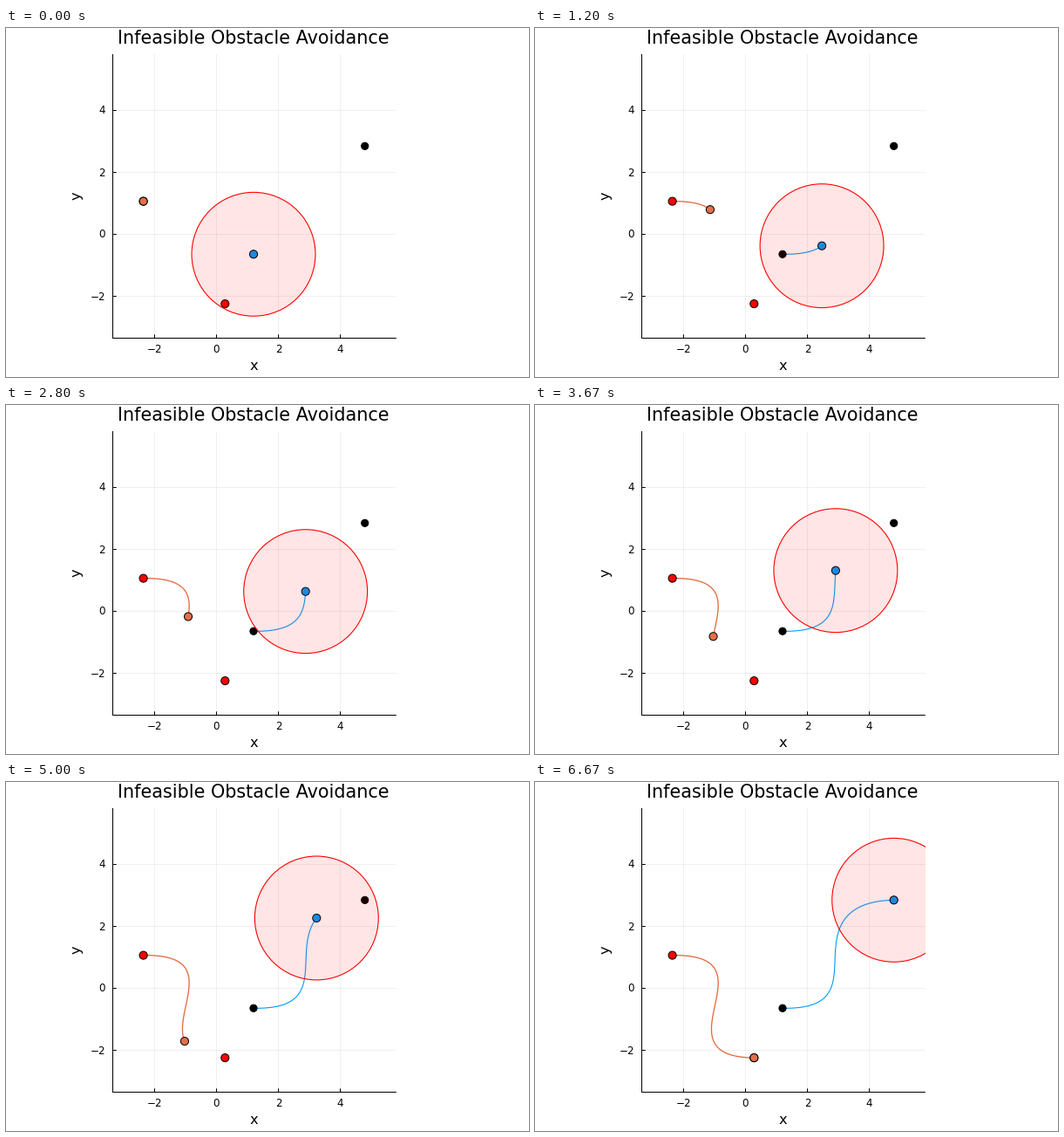
These frames come from a looping animation (600 by 400 pixels, 6740 ms). A matplotlib script:

```python
import numpy as np
import matplotlib.pyplot as plt
from matplotlib.animation import FuncAnimation
from matplotlib.patches import Circle, Rectangle

W, H, DPI = 600, 400, 100
LOOP, TICK = 6740, 20            # ms
STEPS, RATE = 100, 15            # simulation steps, steps per second
LEFT, RIGHT, TOP, BOTTOM = 122.5, 447.3, 30.5, 355.5
UNIT, X0, Y0 = 35.47, 241.6, 236.4
BLUE, ORANGE = "#009afa", "#e36f47"

plt.rcParams["font.family"] = "DejaVu Sans"


def pt(px):
    return px * 72 / DPI


def ease(s):
    return s * s * (3 - 2 * s)


def paths(blue_a, blue_b, orange_a, orange_b):
    """S-shaped paths: a shared sideways sweep that brakes midway, plus a late spread."""
    s = np.arange(STEPS + 1) / STEPS
    v = 2 * s - 1
    q = 1 - v * v
    sweep = (1 + v**3 - (0.13 - 0.07 * v) * v * q - 0.015 * q * q) / 2
    spread = ease(s) - 3.6 * s**2.5 * (1 - s)**2
    dx_blue, dx_orange = blue_b[0] - blue_a[0], orange_b[0] - orange_a[0]
    mean, half = (dx_blue + dx_orange) / 2, (dx_blue - dx_orange) / 2

    def path(a, b, side, lag):
        x = a[0] + mean * sweep + side * half * spread
        y = a[1] + (b[1] - a[1]) * ease(s - lag)
        return x, y

    return path(blue_a, blue_b, 1, 0.009), path(orange_a, orange_b, -1, 0.005)


blue, orange = paths((284, 259.3), (411.7, 135.3), (157.6, 198.6), (251.3, 316.1))

fig = plt.figure(figsize=(W / DPI, H / DPI), dpi=DPI, facecolor="white")
ax = fig.add_axes([0, 0, 1, 1])
ax.set_xlim(0, W)
ax.set_ylim(H, 0)
ax.axis("off")


def line(xs, ys, color="black", width=1.0, **kw):
    return ax.plot(xs, ys, color=color, lw=pt(width), snap=False, **kw)[0]


def label(x, y, text, size, ha="center", **kw):
    ax.text(x, y, text, fontsize=pt(size), ha=ha, va="baseline", **kw)


def dot(x, y, color, z, r=4.55):
    return ax.add_patch(Circle((x, y), r, fc=color, ec="black", lw=pt(1), zorder=z))


# Grid, ticks and tick labels, with lines on pixel centres
for v in (-2, 0, 2, 4):
    x, y = int(X0 + v * UNIT) + 0.5, int(Y0 - v * UNIT) + 0.5
    name = str(v).replace("-", "\u2212")
    line([x, x], [TOP, BOTTOM], alpha=0.06, zorder=1)
    line([LEFT, RIGHT], [y, y], alpha=0.06, zorder=1)
    line([x, x], [BOTTOM, BOTTOM - 3.7], zorder=2)
    line([LEFT, LEFT + 3.7], [y, y], zorder=2)
    label(x, 371.8, name, 11.9)
    label(114.2, y + 4, name, 11.9, ha="right")

line([LEFT, LEFT], [TOP, BOTTOM], zorder=2)
line([LEFT, RIGHT], [BOTTOM, BOTTOM], zorder=2)

label(284.1, 18.4, "Infeasible Obstacle Avoidance", 20.8)
label(284.6, 392.2, "x", 16.3)
label(85.3, 192.2, "y", 16.3, rotation=90, rotation_mode="anchor")

# Start and goal markers
for (xs, ys), color, r in ((blue, "black", 4.1), (orange, "red", 4.55)):
    for k in (0, -1):
        dot(xs[k], ys[k], color, 4, r)

agents = []
for (xs, ys), color, width in ((blue, BLUE, 1.1), (orange, ORANGE, 1.35)):
    trail = line([], [], color, width, zorder=3)
    agents.append((xs, ys, trail, dot(xs[0], ys[0], color, 5)))

# Obstacle disc, drawn over everything and cut at the plot area
area = Rectangle((LEFT, TOP), RIGHT + 0.6 - LEFT, BOTTOM - TOP, transform=ax.transData)
disc = Circle((0, 0), 2 * UNIT, fc=(1, 0, 0, 0.1), ec="red", lw=pt(1.1), zorder=6)
ax.add_patch(disc)
disc.set_clip_path(area)


def draw(k):
    ms = k * TICK + 15           # round step changes to the nearest tick
    i = min(ms * RATE // 1000, STEPS)
    for xs, ys, trail, marker in agents:
        trail.set_data(xs[:i + 1], ys[:i + 1])
        marker.center = xs[i], ys[i]
    disc.center = blue[0][i], blue[1][i]
    return []


anim = FuncAnimation(fig, draw, frames=LOOP // TICK, interval=TICK,
                     repeat=True, repeat_delay=0)
plt.show()
```
